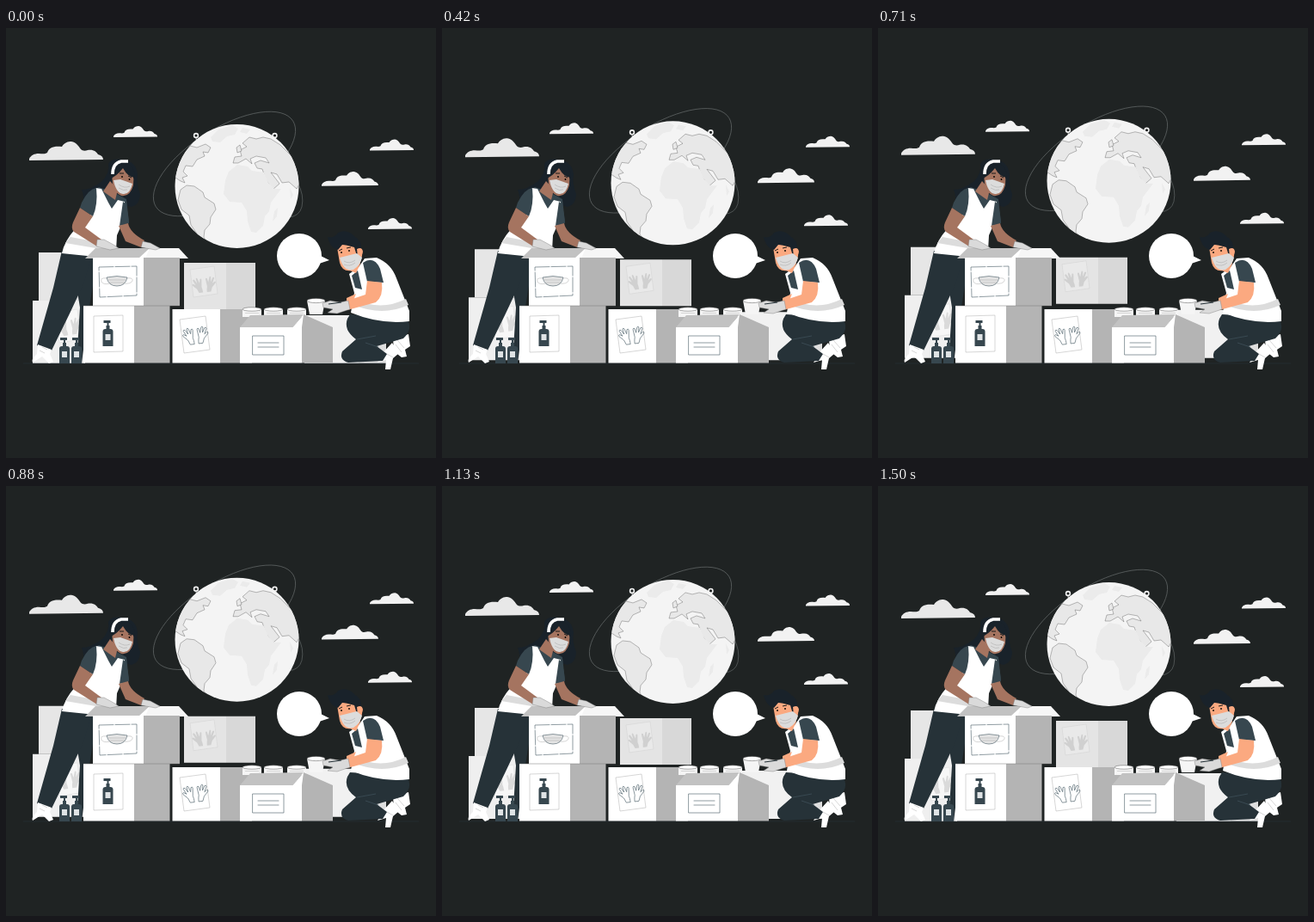
Animation, 500 px wide and 500 px high, one loop 1.54 s. Source, as an HTML page:

```html
<!DOCTYPE html>
<html lang="en">
<head>
<meta charset="utf-8">
<title>Packing donations</title>
<style>
html, body { margin: 0; height: 100%; overflow: hidden; background: #1f2323; }
svg { display: block; width: 100%; height: 100%; }
.line { fill: none; stroke: #455a64; stroke-width: .6; stroke-linejoin: round; stroke-linecap: round; }
.thin { fill: none; stroke: #999; stroke-width: .4; }
.brow { fill: none; stroke: #1b1b1b; stroke-width: 1; }
.land { fill: #e8e8e8; stroke: #555; stroke-width: .4; stroke-linejoin: round; }
.pale { fill: #e6e6e6; }
.faint { fill: #ebebeb; }
.white { fill: #fff; }
.side { fill: #b4b4b4; }
.flap { fill: #c2c2c2; }
.shirt { fill: #37474f; }
.pants { fill: #263238; }
.glove { fill: #dadada; stroke: #777; stroke-width: .4; }
.mask { fill: #dcdcdc; }
.brown { fill: #a57460; }
.peach { fill: #fba980; }
.hair { fill: #19222a; }
.stripe { fill: #dcdcdc; }
</style>
</head>
<body>
<svg viewBox="0 0 500 500">
<defs>
  <path id="cloud" d="M0 20C2 16 6 14 11 14C15 14 18 15 21 13C23 7 28 5 38 6C41 1 45 0 49 0C55 1 57 5 60 9C62 11 65 11 68 10C75 9 78 12 80 15C84 16 86 18 86 21L0 22Z"/>
  <path id="hand" d="M-2 9L-4 4L-9 -1Q-10 -3 -8 -3L-5 -1L-8 -7Q-8 -9 -6 -8L-3 -3L-4 -9Q-3 -11 -2 -9L0 -3L1 -8Q3 -9 3 -7L2 2Q3 5 3 9Z"/>
  <g id="hands">
    <use href="#hand" x="-5"/>
    <use href="#hand" transform="translate(6) scale(-1 1)"/>
  </g>
  <g id="pin">
    <path d="M0 3L1 9" stroke="#ddd" stroke-width="1"/>
    <circle r="2.4" fill="#1f2323" stroke="#f2f2f2" stroke-width="1.6"/>
  </g>
  <g id="bottle">
    <path d="M-6 8Q-6 5 -3 5H3Q6 5 6 8V25H-6Z"/>
    <path d="M-2 1H2V5H-2ZM-5 -5H3V-2H1V2H-1V-2H-5Z"/>
    <path d="M-3 11H3V18H-3Z" fill="#dfe3e5"/>
  </g>
  <g id="can">
    <path d="M-11 0V9H11V0Z" fill="#f5f5f5"/>
    <ellipse rx="11" ry="2.2" fill="#fff" stroke="#555" stroke-width=".5"/>
    <path d="M-8 4.5H8" stroke="#ccc" stroke-width=".8"/>
  </g>
  <clipPath id="disc"><circle cx="268.5" cy="184" r="72"/></clipPath>
</defs>

<g id="drift">
  <use href="#cloud" transform="translate(27 132)" fill="#e8e8e8"/>
  <g fill="#f2f2f2">
    <use href="#cloud" transform="translate(125 114) scale(.594)"/>
    <use href="#cloud" transform="translate(423 129.5) scale(.594)"/>
    <use href="#cloud" transform="translate(367 167) scale(.767)"/>
    <use href="#cloud" transform="translate(421 221) scale(.594)"/>
  </g>

  <g fill="none" stroke="#626767" stroke-width=".7">
    <ellipse cx="254" cy="158" rx="94" ry="41" transform="rotate(-32 254 158)"/>
    <path d="M339 180Q347 194 344 208Q341 219 329 220"/>
  </g>
  <use href="#pin" x="221" y="125"/>
  <use href="#pin" transform="translate(312.5 125) scale(-1 1)"/>
  <circle cx="268.5" cy="184" r="72" fill="#f4f4f4"/>
  <g clip-path="url(#disc)">
    <path class="faint" d="M238 127L247 118L263 113L270 117L266 124L257 126L249 133L240 132ZM275 116L284 118L280 123L272 121Z"/>
    <path class="land" d="M194 172L204 149L214 137L222 139L232 135L238 139L235 145L229 144L231 149L222 153L217 161L209 160L206 167L211 172L205 174L208 180L203 178Z"/>
    <path class="land" d="M203 188L210 183L219 184L229 191L231 197L242 204L244 211L238 220L237 228L231 235L230 243L233 249L224 242L215 229L213 218L204 211L200 200Z"/>
    <path class="land" d="M264 157L266 150L274 149L272 142L280 138L275 134L283 127L291 129L299 127L308 129L319 136L334 151L343 178L338 187L329 179L321 180L315 170L308 168L318 181L310 188L302 176L298 164L292 163L289 157L296 154L306 157L302 151L291 149L284 152L286 158L279 152L270 157Z"/>
    <path class="faint" d="M259 167L269 159L281 161L286 166L300 168L305 180L312 187H320L308 203L306 213L301 219L299 230L291 238L285 237L281 225L280 213L274 203L260 202L253 193L255 177Z"/>
    <path class="faint" d="M312 213L316 209L315 219L310 225ZM330 186L334 194L331 199Z"/>
    <path class="land" d="M268 139L272 136L274 143L269 145Z"/>
  </g>

  <path class="pale" d="M38 261H92V317H38Z"/>
  <path fill="#efefef" d="M31 317H92V390H31Z"/>
  <path d="M58 331L83 327L87 362L62 366Z" fill="#f7f7f7" stroke="#ddd" stroke-width=".6"/>
  <use href="#hands" transform="translate(73 348) rotate(-8)" fill="#dadada"/>

  <path fill="#e4e4e4" d="M207 273H256V327H207Z"/>
  <path fill="#d8d8d8" d="M256 273H290V327H256Z"/>
  <path d="M214 281L242 277L246 309L218 313Z" fill="#e9e9e9" stroke="#d0d0d0" stroke-width=".5"/>
  <use href="#hands" transform="translate(230 299) rotate(-7) scale(.93)" fill="#d0d0d0"/>

  <path fill="#f1f1f1" d="M347 334H442V390H347Z"/>
  <path fill="#dedede" d="M410 334H442V390H410Z"/>
</g>

<!-- Boxes -->
<path d="M20 390H480" stroke="#263238" stroke-width=".6"/>
<path class="side" d="M249 327H286V389.500H249Z"/>
<path class="white" d="M193.500 327H249V389.500H193.500Z"/>
<path class="thin" d="M202 339L232 335L237 374L207 378Z"/>
<use href="#hands" class="line" transform="translate(220 358) rotate(-7)"/>

<use href="#can" x="286" y="327"/>
<use href="#can" x="311" y="327"/>
<use href="#can" x="338" y="327"/>
<path class="flap" d="M272 348L284 334L346 333L333 349Z"/>
<path class="white" d="M333 348.500L346 333V349Z"/>
<path class="side" d="M346 333L380 348H344Z"/>
<path class="white" d="M272 348H344V389.500H272Z"/>
<path class="side" d="M344 348H380V389.500H344Z"/>
<path class="line" d="M287 358H323V380H287ZM293 366H317M293 371H317"/>

<!-- Woman -->
<path class="hair" d="M119 158Q123 151 136 153Q151 155 153 170Q151 180 156 193Q156 205 146 208L132 204L116 197Q103 197 89 211Q92 197 88 188Q99 188 112 178Q121 168 119 158Z"/>
<path class="pants" d="M77 270L103 260L101 300L94 342L88 390H82L86 325Z"/>
<path class="pants" d="M65 259L100 263L90 298L74 332L53 375L36 369L55 302Z"/>
<path class="white" d="M37 368L53 374L51 379L55 388L50 390L42 382L31 389Q29 385 36 379Z"/>
<path class="thin" d="M39 375L45 378M42 371L48 374"/>
<path class="shirt" d="M108 185L127 192L140 199L143 226L131 232L111 221L93 212Q95 191 108 185Z"/>
<path class="brown" d="M121 178L130 188L127 200L113 190Z"/>
<path class="white" d="M104 186L111 187L119 203L123 210L130 200L138 202L136 225L129 241L128 259L114 267L65 262Q68 247 82 232L98 218Q106 204 104 186Z"/>
<path class="stripe" d="M75 243L128 253V260L69 250Z"/>
<path class="shirt" d="M105 186Q96 187 88 203L86 209L101 219Q107 206 105 186ZM136 202Q141 204 143 227L132 230Z"/>
<path class="brown" d="M86 209L101 219L92 232L111 246L106 254L79 237Q75 233 78 226Z"/>
<path class="brown" d="M131 230L142 227Q144 238 161 247L157 255L139 248Z"/>
<path class="brown" d="M124 165Q131 156 142 162Q150 168 148 183Q144 197 134 195Q121 190 124 165Z"/>
<path class="hair" d="M121 169Q123 154 137 156Q150 159 150 174Q142 174 136 163Q128 173 121 175Z"/>
<path d="M124 170Q124 157 134 155L142 155" fill="none" stroke="#fff" stroke-width="3.600"/>
<path class="mask" d="M125 177L133 176L147 181Q144 194 136 193Q128 192 125 177Z"/>
<path class="thin" d="M131 182Q138 187 144 184M131 186Q137 190 141 188"/>
<path class="brow" d="M132 169L137 169M142 172L146 174"/>
<circle cx="135" cy="173" r=".9"/><circle cx="143.500" cy="176" r=".9"/>

<path class="flap" d="M92 268L104 256L167 256L160 268Z"/>
<path class="white" d="M154 268L167 256V268Z"/>
<path fill="#f6f6f6" d="M167 256H201L212 268H162Z"/>
<path class="white" d="M101 267H160V323H101Z"/>
<path class="side" d="M160 267H202V323H160Z"/>
<path class="line" d="M108 278L152 277V311L109 313Z" stroke-dasharray="17 2"/>
<path class="thin" d="M117 291Q109 290 111 295Q113 299 121 297M141 291Q148 290 147 294Q145 298 137 297"/>
<path d="M117 290Q129 287 141 290Q139 300 129 300Q119 300 117 290Z" fill="#e4e4e4" stroke="#455a64" stroke-width=".6"/>
<path class="thin" d="M119 293H139M120 296H138"/>
<path class="white" d="M90 323H149V389.500H90Z"/>
<path class="side" d="M149 323H190.500V389.500H149Z"/>
<path d="M90 323H202" stroke="#777" stroke-width=".5"/>
<path class="thin" d="M102 335L136 334V376L102 377Z"/>
<use href="#bottle" class="shirt" x="118.500" y="345"/>
<use href="#bottle" class="shirt" x="68" y="365"/>
<use href="#bottle" class="shirt" x="82" y="365"/>
<path class="glove" d="M106 246L114 246L125 252L131 256L121 258L105 254Z"/>
<path class="glove" d="M159 248L168 250L179 256L174 258L157 255Z"/>

<!-- Speech bubble -->
<circle class="white" cx="341" cy="265" r="26"/>
<path class="white" d="M364 264L376 270L364 274Z"/>

<!-- Man -->
<path class="white" d="M450 361L468 356L470 370L464 374L466 382L460 383L451 376ZM438 378L449 366L456 379L450 384L447 397L441 397L442 386L432 389Z"/>
<path class="thin" d="M453 368L460 377M455 363L463 372M443 379L450 383"/>
<path class="pants" d="M400 333L466 337Q474 350 462 361L431 370L443 379L438 387L398 389Q387 386 391 376L407 362Q392 351 397 338Z"/>
<path d="M408 362L430 358M418 366L433 371" fill="none" stroke="#455a64" stroke-width=".6"/>
<path class="white" d="M399 286L410 278L417 268L431 267Q448 274 454 291L469 329V341Q435 345 401 331L405 308Z"/>
<path class="stripe" d="M407 315Q435 330 465 315L468 322Q438 336 404 322Z"/>
<path class="shirt" d="M415 273Q428 264 435 280L439 296L420 295Z"/>
<path class="shirt" d="M402 288L409 282L414 304L406 302Z"/>
<path class="peach" d="M420 294L437 296Q439 312 430 319L397 328L394 318L418 310Z"/>
<path class="peach" d="M396 314L407 309L404 317L396 320Z"/>
<path class="peach" d="M405 263L412 274L407 285L400 282Z"/>
<path class="peach" d="M385 255Q396 244 408 252Q416 256 414 265Q412 278 402 282Q391 284 388 273Z"/>
<path class="hair" d="M386 258Q376 255 374 243Q382 245 386 238Q397 233 406 243Q414 247 413 258L408 265L405 255Q395 252 391 252Z"/>
<path class="peach" d="M408 257Q414 254 415 260Q414 266 409 266Z"/>
<path class="mask" d="M388 267L396 265L408 262L414 267Q412 276 404 281Q393 284 388 267Z"/>
<path class="thin" d="M393 271Q399 275 406 270M393 275Q400 278 406 273"/>
<path class="brow" d="M387 259L391 257M396 256L401 255"/>
<circle cx="390" cy="261" r=".9"/><circle cx="399" cy="259" r=".9"/>
<path fill="#f5f5f5" d="M350 317L371 317L368 333H353Z"/>
<ellipse cx="360.500" cy="317" rx="10.500" ry="2.600" fill="#fff" stroke="#555" stroke-width=".5"/>
<path class="glove" d="M368 320L377 317L388 319L398 317L400 327L385 332L374 331L380 327L369 325Z"/>
<path d="M375 321L390 319" stroke="#263238" stroke-width="1.200"/>
</svg>
<script>
const drift = document.getElementById('drift');
const LOOP = 1540, HALF = 740, RISE = 6.5;

function draw() {
  const t = performance.now() % LOOP;
  const lift = RISE * Math.max(0, 1 - Math.abs(t - HALF) / HALF);
  drift.setAttribute('transform', `translate(0 ${-lift})`);
  requestAnimationFrame(draw);
}
draw();
</script>
</body>
</html>
```
